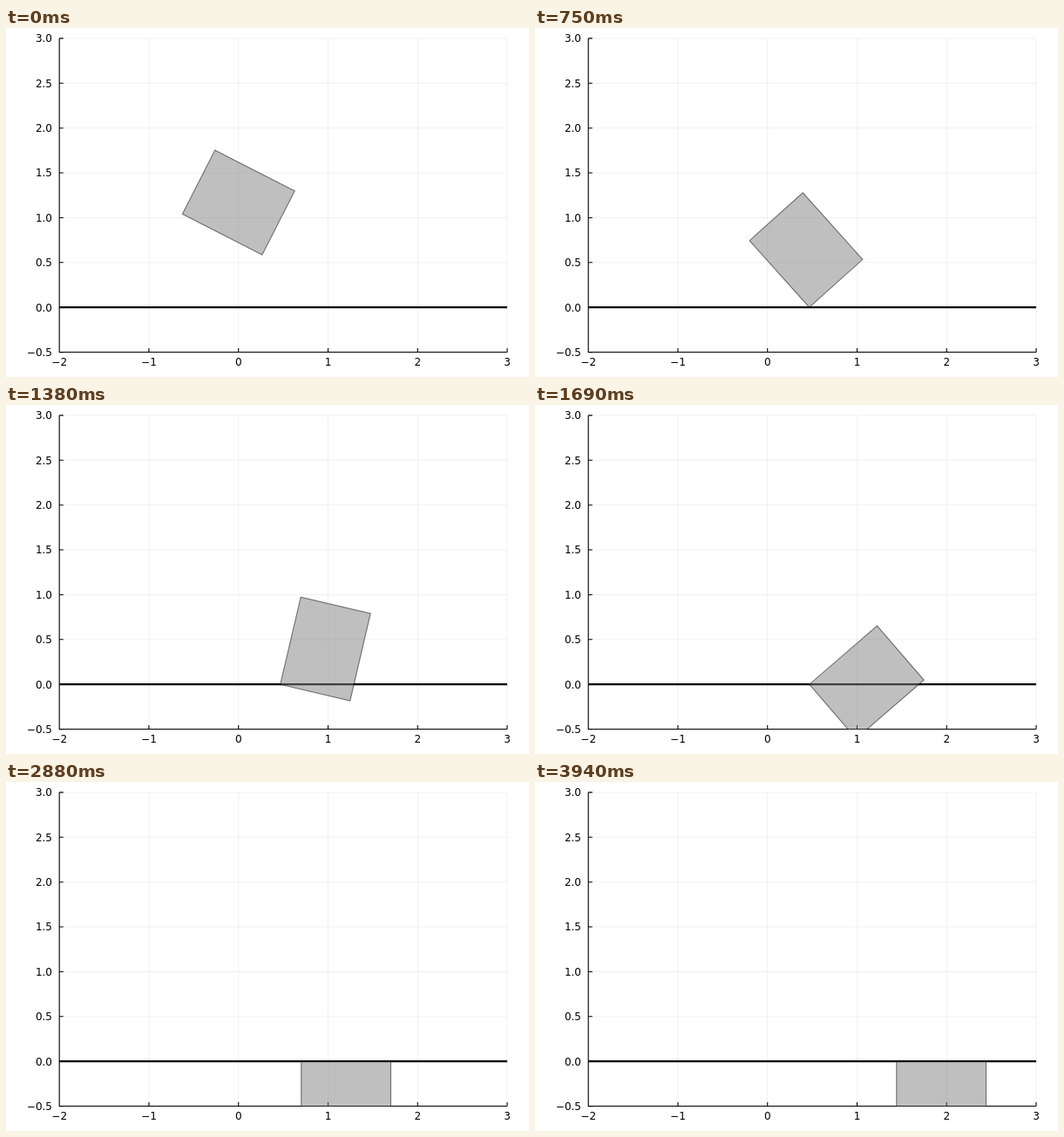
An HTML page that plays this animation: 600 px wide and 400 px high, repeating every 4000 ms.

```html
<!DOCTYPE html>
<html lang="en">
<head>
<meta charset="utf-8">
<title>Tumbling box</title>
<style>
  html, body { margin: 0; width: 100%; height: 100%; overflow: hidden; background: #fff; }
  svg { display: block; }
  text { font: 12px "DejaVu Sans", sans-serif; fill: #000; }
</style>
</head>
<body>
<svg id="plot" width="600" height="400" viewBox="0 0 600 400">
  <clipPath id="area"><rect x="61" y="12" width="514" height="359.5"/></clipPath>
  <path id="grid" stroke="#000" stroke-opacity=".1" stroke-width=".6" fill="none"/>
  <path id="axes" stroke="#000" stroke-width="1.1" fill="none"/>
  <g id="labels"></g>
  <g clip-path="url(#area)">
    <path d="M61 320.1H575" stroke="#000" stroke-width="2.1"/>
    <polygon id="box" fill="#808080" fill-opacity=".5" stroke="#000" stroke-opacity=".5" stroke-width="1.1"/>
  </g>
</svg>
<script>
const $ = id => document.getElementById(id);
const UNIT = 102.76, LEFT = 61.2, RIGHT = 575, TOP = 12, BOTTOM = 371.5;
const GROUND = 320.2, PIVOT = 314.7;
const W = UNIT, H = 0.8 * UNIT;
const RAD = Math.PI / 180;
const LOOP = 4000, STEP = 62.5, LAST = 63;
const LANDED = 7, TOPPLE = 18, FLAT = 38;
const HELD = [21, 24, 28, 31, 33]; // steps on which the falling box pauses

function drawAxes() {
  let grid = '', axes = `M${LEFT} ${TOP}V${BOTTOM}H${RIGHT}`;
  const label = (text, x, y, anchor) => {
    const el = document.createElementNS('http://www.w3.org/2000/svg', 'text');
    el.setAttribute('x', x);
    el.setAttribute('y', Math.round(y));
    el.setAttribute('text-anchor', anchor);
    el.textContent = text.replace('-', '\u2212');
    $('labels').append(el);
  };
  for (let v = -2; v <= 3; v++) {
    const x = LEFT + (v + 2) * UNIT;
    grid += `M${x} ${TOP}V${BOTTOM}`;
    axes += `M${x} ${BOTTOM}v-4.6`;
    label(String(v), x, 387.4, 'middle');
  }
  for (let v = -0.5; v <= 3; v += 0.5) {
    const y = GROUND - v * UNIT;
    grid += `M${LEFT} ${y}H${RIGHT}`;
    axes += `M${LEFT} ${y}h4.6`;
    label(v.toFixed(1), 53, y + 4.4, 'end');
  }
  $('grid').setAttribute('d', grid);
  $('axes').setAttribute('d', axes);
}

// Free fall with a slow spin; returns the lowest corner
function fall(n) {
  const angle = 27.05 + 0.775 * n;
  const a = angle * RAD + Math.atan2(H, W), r = Math.hypot(W, H) / 2;
  const x = 266.8 + 3.28 * n + r * Math.cos(a);
  const y = 200 + 0.6 * n + 1.095 * n * n + r * Math.sin(a);
  return [x, Math.min(y, GROUND), angle];
}

// Tipping over the corner like an inverted pendulum
function tip(n) {
  return [PIVOT, GROUND, 51.4 + 9.8 * Math.sinh(0.33 * (n - 13))];
}

// Steady turn, stopping just past flat
function topple(n) {
  const turns = n - TOPPLE - HELD.filter(h => h <= n).length;
  return [PIVOT, GROUND, Math.min(182, 76.2 + 9 * turns)];
}

// Lying flat, gathering speed along the ground
function slide(n) {
  const s = n - FLAT, lag = 2.87;
  return [PIVOT + 4.52 * (s - lag * (1 - Math.exp(-s / lag))), GROUND, 180];
}

function pose(n) {
  if (n <= LANDED + 1) return fall(Math.min(n, LANDED));
  if (n < TOPPLE) return tip(n);
  return n < FLAT ? topple(n) : slide(n);
}

function drawBox(n) {
  const [x, y, angle] = pose(n);
  const c = Math.cos(angle * RAD), s = Math.sin(angle * RAD);
  const corners = [[0, 0], [0, -H], [-W, -H], [-W, 0]];
  $('box').setAttribute('points', corners.map(([u, v]) =>
    `${(x + u * c - v * s).toFixed(2)},${(y + u * s + v * c).toFixed(2)}`).join(' '));
}

const start = performance.now();
function tick() {
  const t = (performance.now() - start) % LOOP;
  drawBox(Math.min(LAST, Math.floor((t + 3) / STEP)));
  requestAnimationFrame(tick);
}

drawAxes();
tick();
</script>
</body>
</html>
```
